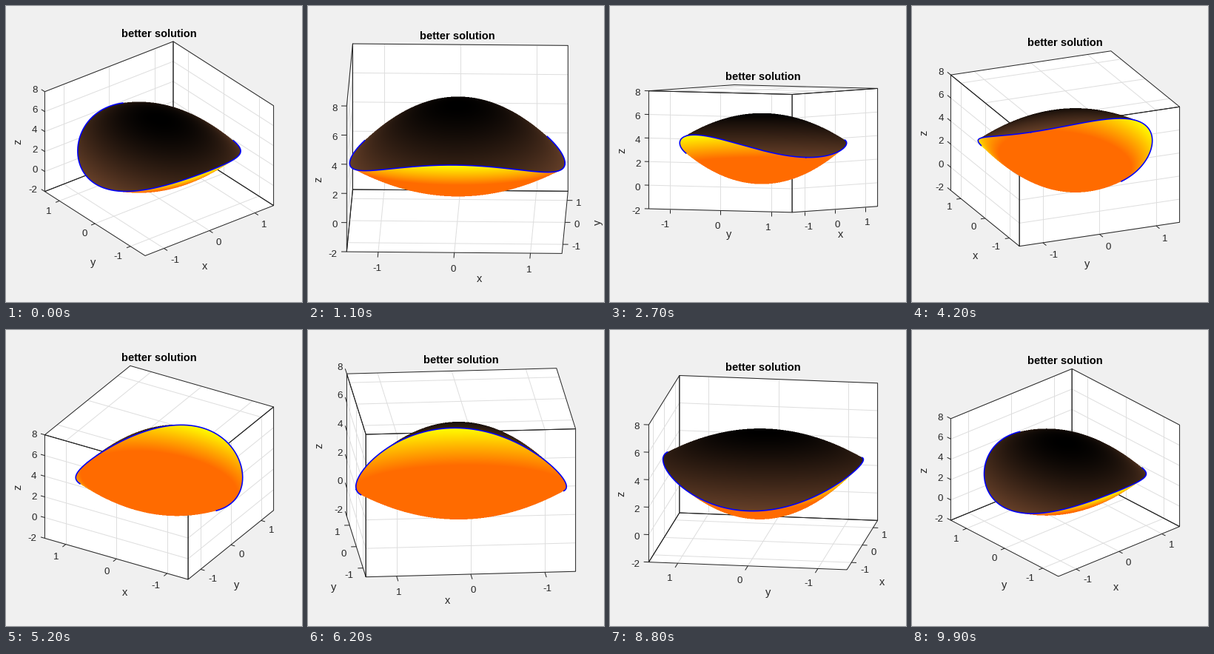
Recreate the animation shown at these times as a matplotlib script. Size 400 by 400 pixels, loop 10 s.

```python
import numpy as np
import matplotlib.pyplot as plt
from matplotlib.animation import FuncAnimation
from matplotlib.collections import LineCollection, PolyCollection

FRAMES = 100
R = np.sqrt(2)
Z0, Z1 = -2, 8
CY = 192.7
INK = (0.15, 0.15, 0.15)
PX = 0.72  # points per pixel at 100 dpi
XY_TICKS = (-1, 0, 1)
Z_TICKS = range(Z0, Z1 + 1, 2)

plt.rcParams["font.family"] = "Liberation Sans"
fig = plt.figure(figsize=(4, 4), dpi=100, facecolor="#f0f0f0")
ax = fig.add_axes([0, 0, 1, 1])
ax.axis("off")

walls = ax.add_collection(PolyCollection([], facecolors="white", edgecolors="none", zorder=0))
grid = ax.add_collection(LineCollection([], colors="#dedede", linewidths=PX, zorder=1))
frame = ax.add_collection(LineCollection([], colors=[INK], linewidths=PX, zorder=2))

# Pixel window for the ray-cast solid, sampled twice per pixel
X_LO, X_HI, Y_LO, Y_HI = 45, 369, 103, 283
SS = 2
gx, gy = np.meshgrid(np.arange(X_LO, X_HI, 1 / SS) + 0.5 / SS,
                     np.arange(Y_LO, Y_HI, 1 / SS) + 0.5 / SS)
solid = ax.imshow(np.zeros((Y_HI - Y_LO, X_HI - X_LO, 4)), aspect="auto",
                  extent=(X_LO, X_HI, Y_HI, Y_LO), interpolation="nearest", zorder=3)
rim, = ax.plot([], [], color="blue", lw=1.6 * PX, zorder=4)
ax.set_xlim(0, 400)
ax.set_ylim(400, 0)


def make_text(s, px, color=INK, **kw):
    return ax.text(0, 0, s, fontsize=px * PX, color=color, ha="center",
                   va="baseline", rotation_mode="anchor", zorder=5, **kw)


title = make_text("better solution", 14.67, "black", fontweight="bold")
names = {n: make_text(n, 14.67) for n in "xyz"}
names["z"].set_rotation(90)
tick_text = {n: [make_text(str(v), 13.33) for v in vals]
             for n, vals in (("x", XY_TICKS), ("y", XY_TICKS), ("z", Z_TICKS))}


class View:
    """Orthographic camera that fits the plot box to the axes width."""

    def __init__(self, k):
        self.az = np.radians(-38 + 3.6 * k)
        self.eldeg = 30 - 1.2 * k if k <= 50 else -30 + 1.2 * (k - 51)
        el = np.radians(self.eldeg)
        self.c, self.s = np.cos(self.az), np.sin(self.az)
        self.ce, self.se = np.cos(el), np.sin(el)
        self.fit(207, 309.2)
        # Lower corner of the floor, where the x and y axes meet
        near = R * np.array([np.sign(self.s), -np.sign(self.c)])
        self.above = self.eldeg > -1e-9
        self.corner = near if self.above else -near
        self.far = -near
        self.setup_axes()
        dx, dy = np.abs(self.right - self.front)
        self.upright = dx < 0.12 * dy
        if self.upright:
            self.fit(201.8, 299)
            self.setup_axes()

    def fit(self, cx, width):
        self.cx = cx
        self.size = width / (abs(self.c) + abs(self.s))
        self.scale = self.size / (2 * R)

    def project(self, x, y, z):
        depth = y * self.c - x * self.s
        up = depth * self.se + (z - 3) / 5 * self.ce
        return np.array([self.cx + self.scale * (x * self.c + y * self.s),
                         CY - self.scale * up])

    def setup_axes(self):
        qx, qy = self.corner
        self.front = self.project(qx, qy, Z0)
        ends = [("x", self.project(-qx, qy, Z0), (-qx, qy)),
                ("y", self.project(qx, -qy, Z0), (qx, -qy))]
        ends.sort(key=lambda e: e[1][0])
        (self.lname, self.left, self.lpos), (self.rname, self.right, _) = ends


def unit(v):
    return v / np.hypot(*v)


def paint_solid(v):
    """Ray-cast z between x^2 + 2y^2 and 6 - 2x^2 - y^2."""
    u, w = (gx - v.cx) / v.scale, (CY - gy) / v.scale
    x = u * v.c - w * v.s * v.se
    y = u * v.s + w * v.c * v.se
    h = w * v.ce
    dx, dy, dz = v.s * v.ce, -v.c * v.ce, v.se

    def span(wx, wy, sign):
        a = wx * dx * dx + wy * dy * dy
        b = wx * x * dx + wy * y * dy + sign * 2.5 * dz
        disc = b * b - a * (wx * x * x + wy * y * y - 3 + sign * 5 * h)
        root = np.sqrt(np.maximum(disc, 0))
        return (-b - root) / a, (-b + root) / a, disc > 0

    lo0, hi0, ok0 = span(1, 2, -1)
    lo1, hi1, ok1 = span(2, 1, 1)
    t = np.minimum(hi0, hi1)
    hit = ok0 & ok1 & (t >= np.maximum(lo0, lo1))
    z = 3 + 5 * (h + t * dz)

    top = np.clip(0.08 * (6 - z), 0, 1)
    warm = 0.42 + 0.58 * np.clip((z - 2) / 2, 0, 1)
    upper = hi1 < hi0
    rgba = np.stack([np.where(upper, 1.25 * top, 1), np.where(upper, 0.78 * top, warm),
                     np.where(upper, 0.5 * top, 0), np.ones_like(z)], -1) * hit[..., None]
    n, m = z.shape
    out = rgba.reshape(n // SS, SS, m // SS, SS, 4).mean((1, 3))
    out[..., :3] /= np.maximum(out[..., 3:], 1e-6)
    solid.set_data(np.clip(out, 0, 1))


def paint_rim(v):
    p = np.linspace(0, 2 * np.pi, 721)
    x, y = R * np.cos(p), R * np.sin(p)
    dx, dy, dz = v.s * v.ce, -v.c * v.ce, v.se
    seen = ((0.8 * x * dx + 0.4 * y * dy + dz > 0)
            | (0.4 * x * dx + 0.8 * y * dy - dz > 0))
    pts = v.project(x, y, 2 + y * y)
    rim.set_data(*np.where(seen, pts, np.nan))


def paint_box(v):
    fx, fy = v.far
    zb = Z0 if v.above else Z1

    def line(*pts):
        return np.array([v.project(*p) for p in pts])

    faces = [line((fx, -R, Z0), (fx, R, Z0), (fx, R, Z1), (fx, -R, Z1)),
             line((-R, fy, Z0), (R, fy, Z0), (R, fy, Z1), (-R, fy, Z1)),
             line((-R, -R, zb), (R, -R, zb), (R, R, zb), (-R, R, zb))]
    walls.set_verts(faces)
    rules = []
    for t in XY_TICKS:
        rules += [line((t, fy, Z0), (t, fy, Z1)), line((fx, t, Z0), (fx, t, Z1)),
                  line((t, -R, zb), (t, R, zb)), line((-R, t, zb), (R, t, zb))]
    for t in Z_TICKS:
        rules += [line((-R, fy, t), (R, fy, t)), line((fx, -R, t), (fx, R, t))]
    grid.set_segments(rules)
    return [np.vstack([f, f[:1]]) for f in faces]


def paint_axes(v):
    ticks = []
    length = 0.025 * v.size
    gap = length + 5.5
    qx, qy = v.corner
    flat = abs(v.eldeg) < 6
    sway = 0.24 * (v.front[0] - v.cx)

    for name, end in ((v.lname, v.left), (v.rname, v.right)):
        is_left = name == v.lname
        side = -1 if is_left else 1
        other = v.right if is_left else v.left
        d = np.array([0, 1.0]) if flat else unit(v.front - other)
        upright = v.upright and not is_left
        centred = not flat and abs(d[0]) < 0.35
        ha = "center" if centred else ("right" if is_left else "left")
        for val, txt in zip(XY_TICKS, tick_text[name]):
            p = v.project(val, qy, Z0) if name == "x" else v.project(qx, val, Z0)
            ticks.append(np.array([p, p + length * d]))
            pos = p + gap * d + [-0.5, 4.8 + (2 if upright else 8.5)]
            txt.set_position(pos)
            txt.set_ha(ha)

        mid = (v.front + end) / 2
        label = names[name]
        label.set_rotation(90 if upright else 0)
        if upright:
            label.set_position(mid + [48.5, 0])
        else:
            drop = 25 + 1.9 * length + 0.25 * (v.front[1] - end[1])
            lean = -2 * side * abs(np.sin(2 * v.az))
            label.set_position(mid + [sway + lean, drop])

    d = unit(v.left - v.front)
    for val, txt in zip(Z_TICKS, tick_text["z"]):
        p = v.project(*v.lpos, val)
        ticks.append(np.array([p, p + length * d]))
        txt.set_position(p + gap * d + [-2 * d[1] ** 2, 6.8])
        txt.set_ha("right")
    mid = v.project(*v.lpos, 3)
    names["z"].set_position(mid + [3.8 - 30 - length, 0.5])
    return ticks


def draw(k):
    v = View(k)
    outline = paint_box(v)
    frame.set_segments(outline + paint_axes(v))
    paint_solid(v)
    paint_rim(v)
    top = min(p[:, 1].min() for p in outline)
    title.set_position((v.cx, top - 6.3))
    return []


anim = FuncAnimation(fig, draw, frames=FRAMES, interval=100, repeat=True, repeat_delay=0)
plt.show()
```
